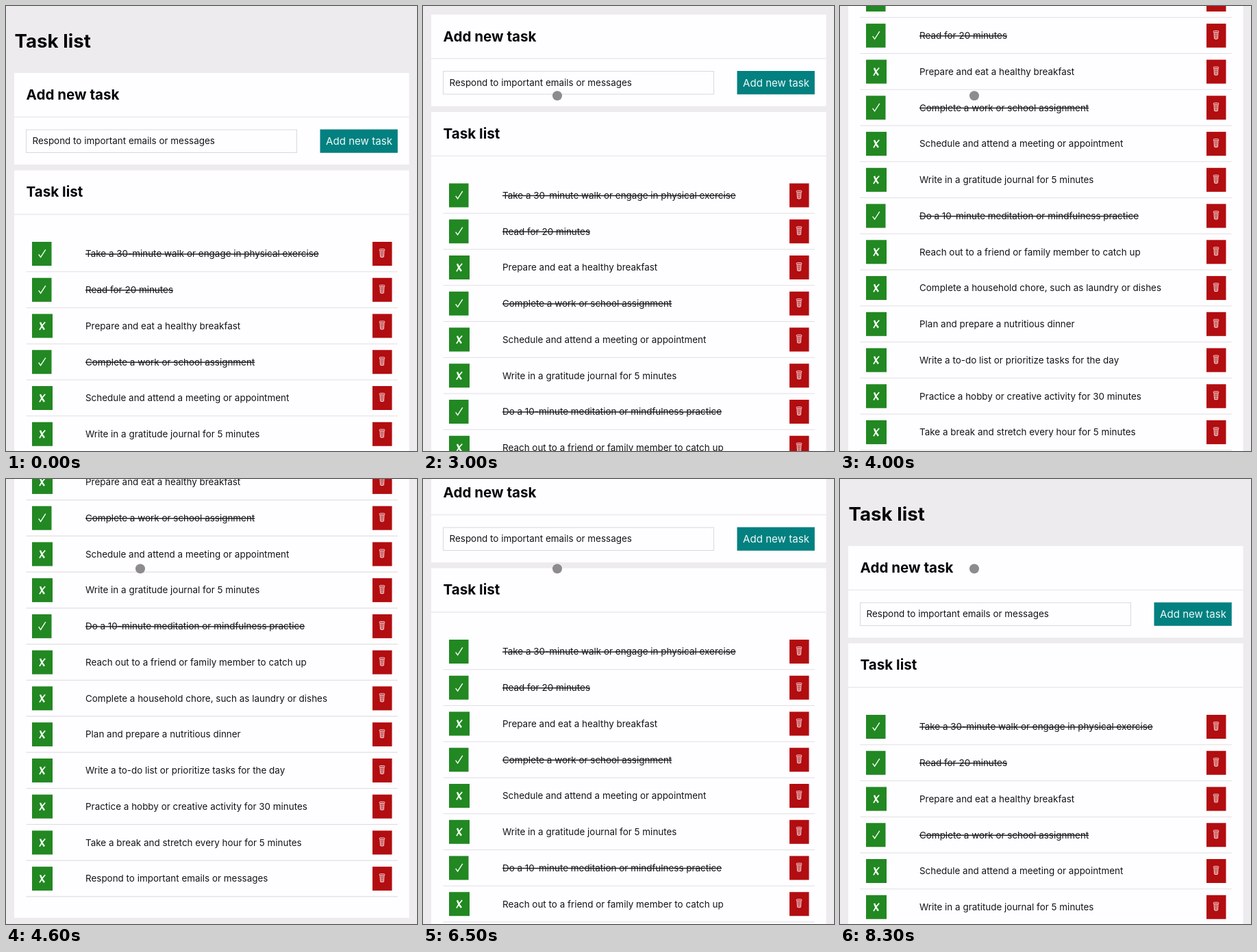
An HTML page that plays this animation: 600x651 px, repeating every 8500 ms.

```html
<!DOCTYPE html>
<html lang="en">
<head>
<meta charset="utf-8">
<title>Task list</title>
<style>
  html, body { margin: 0; width: 100%; height: 100%; overflow: hidden; background: #edebee; }
  svg { display: block; width: 100%; height: 100%; }
  text { font-family: Inter, Roboto, sans-serif; font-size: 13.45px; fill: #141316; }
  .title { font-size: 27.7px; font-weight: 700; fill: #060507; }
  .head { font-size: 20.6px; font-weight: 700; fill: #060507; }
  .add { font-size: 15.1px; fill: #eefafa; }
  .done { text-decoration: line-through; }
  .card { fill: #fefdff; }
  .rule { stroke: #e8e6ea; stroke-width: 1.3; }
  .sep { stroke: #e0dfe3; stroke-width: 1.1; }
</style>
</head>
<body>
<svg viewBox="0 0 600 651" preserveAspectRatio="none">
  <defs>
    <g id="check">
      <rect x="38" y="-17.5" width="28.5" height="35" fill="#228822"/>
      <path d="M47.6 .8 L50.6 5 L57.8 -6.2" fill="none" stroke="#f4fff4" stroke-width="1.4"/>
    </g>
    <g id="cross">
      <rect x="38" y="-17.5" width="30" height="35" fill="#228822"/>
      <path d="M50 -5.4 Q52 1 56 5.4" fill="none" stroke="#f4fff4" stroke-width="2.5"/>
      <path d="M57.2 -5.6 Q52.5 -1 49 5.8" fill="none" stroke="#f4fff4" stroke-width="1.8"/>
    </g>
    <g id="bin">
      <rect x="535" y="-17.5" width="28.5" height="35" fill="#b20d10"/>
      <g fill="none" stroke="#f6d9d9" stroke-width="1">
        <rect x="545.2" y="-6.9" width="7.6" height="2.2" rx="1"/>
        <path d="M546 -4.7 L546.6 4.6 Q549 5.6 551.4 4.6 L552 -4.7"/>
        <path d="M548 -4.4 L548.2 4.6 M550 -4.4 L549.8 4.6" stroke-width=".8"/>
        <path d="M546.3 -1.6 H551.7 M546.5 1.6 H551.5" stroke-width=".5" opacity=".6"/>
      </g>
    </g>
  </defs>
  <rect width="600" height="651" fill="#edebee"/>
  <g id="page">
    <text class="title" x="12.5" y="61.3">Task list</text>
    <rect class="card" x="12" y="98" width="576.5" height="134"/>
    <text class="head" x="29.5" y="137">Add new task</text>
    <path class="rule" d="M12 162.3 H588.5"/>
    <rect x="29.5" y="181" width="395" height="33.5" fill="#fefdff" stroke="#d9d8dc"/>
    <text x="38.5" y="202.3">Respond to important emails or messages</text>
    <rect x="458.5" y="180.5" width="113.3" height="34.3" fill="#038080"/>
    <text class="add" x="467" y="203">Add new task</text>
    <rect class="card" x="12" y="240.5" width="576.5" height="865"/>
    <text class="head" x="29.5" y="279.3">Task list</text>
    <path class="rule" d="M12 304.8 H588.5"/>
    <g id="rows"></g>
  </g>
  <circle id="pointer" cx="196" cy="131.2" r="7" fill="#8d8b8e"/>
</svg>
<script>
const LOOP = 8500, STEP = 100, POINTER_IN = 1600;
const ROW_TOP = 362.5, ROW_PITCH = 52.75;

// A leading asterisk marks a finished task.
const tasks = [
  "*Take a 30-minute walk or engage in physical exercise",
  "*Read for 20 minutes",
  "Prepare and eat a healthy breakfast",
  "*Complete a work or school assignment",
  "Schedule and attend a meeting or appointment",
  "Write in a gratitude journal for 5 minutes",
  "*Do a 10-minute meditation or mindfulness practice",
  "Reach out to a friend or family member to catch up",
  "Complete a household chore, such as laundry or dishes",
  "Plan and prepare a nutritious dinner",
  "Write a to-do list or prioritize tasks for the day",
  "Practice a hobby or creative activity for 30 minutes",
  "Take a break and stretch every hour for 5 minutes",
  "Respond to important emails or messages"
];

// Scroll path: time in ms, offset in px.
const path = [
  [2500, 0], [3000, 85.5], [3600, 253], [4500, 463.6],
  [5400, 463.6], [5800, 384.5], [6500, 110], [6900, 0]
];

const page = document.getElementById("page");
const pointer = document.getElementById("pointer");

document.getElementById("rows").innerHTML = tasks.map((task, i) => {
  const done = task[0] === "*";
  return `<g transform="translate(0 ${ROW_TOP + i * ROW_PITCH})">
    <use href="#${done ? "check" : "cross"}"/>
    <text x="116" y="4.8"${done ? ' class="done"' : ""}>${done ? task.slice(1) : task}</text>
    <use href="#bin"/>
    <path class="sep" d="M29.5 26.2 H571.8"/>
  </g>`;
}).join("");

function slope(i) {
  const a = path[i - 1], b = path[i], c = path[i + 1];
  if (!a || !c || a[1] === b[1] || b[1] === c[1]) return 0;
  return (c[1] - a[1]) / (c[0] - a[0]);
}

// Cubic Hermite curve through the scroll path.
function scrollAt(t) {
  const i = path.findIndex(p => p[0] > t) - 1;
  if (i < 0) return 0;
  const [t0, y0] = path[i], [t1, y1] = path[i + 1];
  const d = t1 - t0, u = (t - t0) / d, v = 1 - u;
  return v * v * ((1 + 2 * u) * y0 + u * d * slope(i)) +
         u * u * ((3 - 2 * u) * y1 - v * d * slope(i + 1));
}

function draw(now) {
  const t = Math.floor((now % LOOP) / STEP) * STEP;
  page.setAttribute("transform", `translate(0 ${-scrollAt(t).toFixed(2)})`);
  pointer.setAttribute("visibility", t >= POINTER_IN ? "visible" : "hidden");
}

const start = performance.now();
function tick() {
  draw(performance.now() - start);
  requestAnimationFrame(tick);
}
tick();
</script>
</body>
</html>
```
